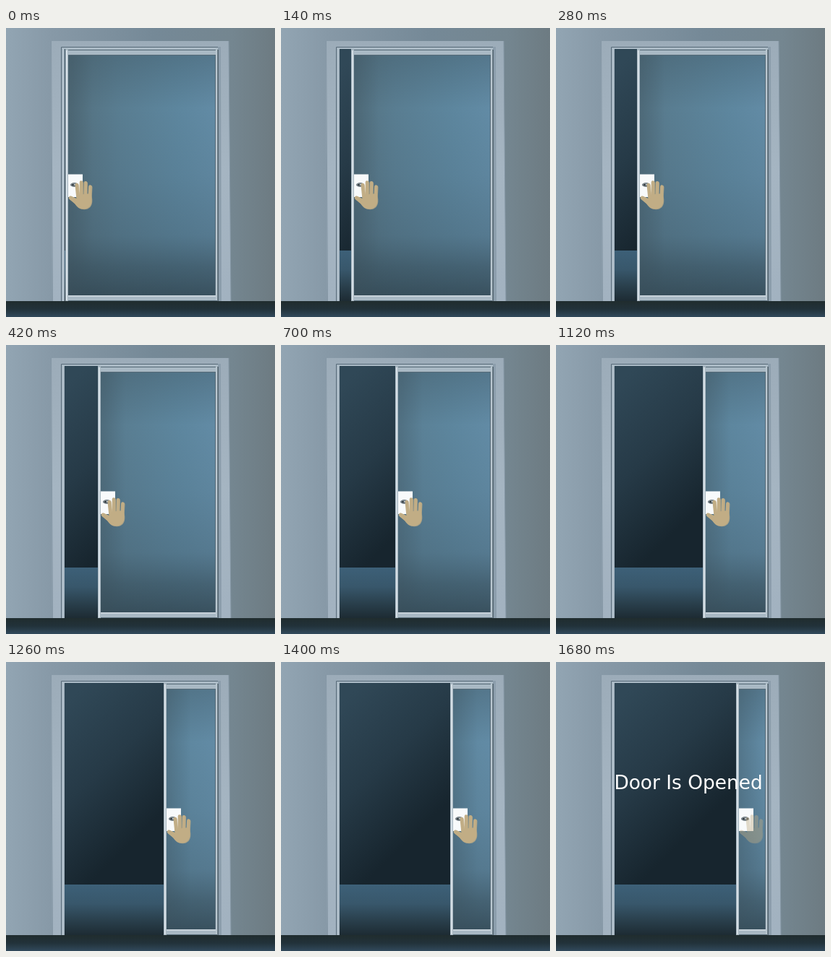
Recreate the animation shown at these times as an HTML page. Size 372 by 400 pixels, loop 8000 ms.

```html
<!DOCTYPE html>
<html lang="en">
<head>
<meta charset="utf-8">
<title>Sliding door</title>
<style>
  html, body { margin: 0; width: 100%; height: 100%; overflow: hidden; background: #71838f; }
  svg { display: block; width: 372px; height: 400px; }
  text { font: 26.4px "DejaVu Sans", sans-serif; fill: #fff; }
</style>
</head>
<body>
<svg viewBox="0 0 372 400">
  <defs>
    <linearGradient id="wall">
      <stop offset="0" stop-color="#92a5b3"/>
      <stop offset=".17" stop-color="#8799a7"/>
      <stop offset=".55" stop-color="#758997"/>
      <stop offset=".84" stop-color="#748690"/>
      <stop offset="1" stop-color="#6d7b82"/>
    </linearGradient>
    <linearGradient id="floor" x2="0" y2="1">
      <stop offset="0" stop-color="#202c2e"/>
      <stop offset=".5" stop-color="#22323a"/>
      <stop offset="1" stop-color="#31495b"/>
    </linearGradient>
    <linearGradient id="jamb" x2="0" y2="1">
      <stop offset="0" stop-color="#9cacb9"/>
      <stop offset=".5" stop-color="#a5b5c2"/>
      <stop offset="1" stop-color="#a2b2c0"/>
    </linearGradient>
    <linearGradient id="glass">
      <stop offset="0" stop-color="#536f7d"/>
      <stop offset=".35" stop-color="#597d91"/>
      <stop offset=".75" stop-color="#5d869e"/>
      <stop offset="1" stop-color="#628ba5"/>
    </linearGradient>
    <linearGradient id="glassShade" x2="0" y2="1">
      <stop offset="0" stop-color="#3f5764" stop-opacity=".38"/>
      <stop offset=".22" stop-color="#3f5764" stop-opacity="0"/>
      <stop offset=".5" stop-color="#3a5261" stop-opacity=".1"/>
      <stop offset=".75" stop-color="#3a5260" stop-opacity=".3"/>
      <stop offset=".88" stop-color="#344a56" stop-opacity=".62"/>
      <stop offset="1" stop-color="#30444f" stop-opacity=".82"/>
    </linearGradient>
    <linearGradient id="edgeShade">
      <stop offset="0" stop-color="#3b505c" stop-opacity=".32"/>
      <stop offset="1" stop-color="#3b505c" stop-opacity="0"/>
    </linearGradient>
    <linearGradient id="room" gradientUnits="userSpaceOnUse" x1="95" y1="45" x2="235" y2="190">
      <stop offset="0" stop-color="#304857"/>
      <stop offset=".5" stop-color="#263a47"/>
      <stop offset="1" stop-color="#17252e"/>
    </linearGradient>
    <linearGradient id="roomFloor" x2="0" y2="1">
      <stop offset="0" stop-color="#3d6078"/>
      <stop offset=".38" stop-color="#38576b"/>
      <stop offset=".7" stop-color="#2a404d"/>
      <stop offset="1" stop-color="#1d2b33"/>
    </linearGradient>
    <clipPath id="gap"><rect id="gapRect" x="81" y="28" width="1" height="350"/></clipPath>
    <clipPath id="slot"><rect x="81" y="28" width="208" height="350"/></clipPath>
  </defs>

  <rect width="372" height="378" fill="url(#wall)"/>
  <rect y="378" width="372" height="22" fill="url(#floor)"/>

  <!-- casing -->
  <path d="M62 18H308L311 378H294V30H81V378H64Z" fill="url(#jamb)"/>
  <path d="M62.500 18L64.500 378M308 18L311 378" stroke="#8597a5"/>
  <path d="M76.500 378V26.500H293" fill="none" stroke="#596c7a"/>
  <path d="M79 378V28.500H293" fill="none" stroke="#b0bfca" stroke-width="2"/>
  <path d="M81.500 378V30" stroke="#6d808d"/>
  <path d="M293 26H297L298 378H293Z" fill="#8c9eac"/>

  <!-- closed panel -->
  <rect x="82" y="30" width="210" height="348" fill="#a9b9c4"/>
  <rect x="86" y="38" width="204" height="332" fill="url(#glass)"/>
  <rect x="86" y="38" width="204" height="332" fill="url(#glassShade)"/>
  <path d="M82 30.500H292M84 37.500H290M82 377.500H292M289.500 38V370" stroke="#566a77"/>
  <path d="M84 371H290" stroke="#c6d1d9" stroke-width="2"/>
  <path d="M291 30V377" stroke="#bac7d0" stroke-width="2"/>
  <path d="M293.500 30V378" stroke="#53636f"/>

  <g clip-path="url(#gap)">
    <rect x="81" y="29" width="180" height="279" fill="url(#room)"/>
    <rect x="81" y="308" width="180" height="70" fill="url(#roomFloor)"/>
  </g>

  <g clip-path="url(#slot)">
    <g id="edge">
      <rect x="86" y="38" width="34" height="332" fill="url(#edgeShade)"/>
      <rect x="82" y="30" width="4" height="348" fill="#a9b8c2"/>
      <path d="M84 31V377" stroke="#d3dde4" stroke-width="2"/>
      <rect x="86" y="202.500" width="20" height="31.500" fill="#f8fafb"/>
      <ellipse cx="94.500" cy="217" rx="5.500" ry="3" fill="#707b82"/>
      <path d="M91 216.500H98" stroke="#c5ccd0" stroke-width="1.500"/>
      <circle cx="92.500" cy="217" r="1.300" fill="#252d32"/>
      <circle cx="97.500" cy="217" r="1" fill="#252d32"/>
      <g id="hand">
        <use href="#palm" x=".8" y=".8" color="#3d4748" opacity=".75"/>
        <g id="palm" color="#c1ad85">
          <path d="M97.800 217L99.500 234M104 213.500V234M110 214.300L109.500 234M116.400 219.500L115.500 237"
                fill="none" stroke="currentColor" stroke-width="4.600" stroke-linecap="round"/>
          <path d="M97.300 231L117.700 229L118.500 237C119 246 114 250.500 107.500 250.500C101 250.500 98 247.500 95 243L87.200 236.500C85.800 233.500 88.500 231.500 91 233L97.500 236Z" fill="currentColor"/>
        </g>
      </g>
    </g>
  </g>

  <text id="label" x="80.400" y="176">Door Is Opened</text>
</svg>
<script>
  const LOOP = 8000, STEP = 140, LAST = 11, STRIDE = 15.2, DONE = 1680;
  const [gapRect, edge, hand, label] =
    ["gapRect", "edge", "hand", "label"].map(id => document.getElementById(id));
  const start = performance.now();

  function draw(now) {
    const t = Math.max(0, now - start) % LOOP;
    const shift = Math.floor(Math.min(LAST, Math.floor(t / STEP)) * STRIDE);
    const opened = t >= DONE;
    gapRect.setAttribute("width", shift + 1);
    edge.setAttribute("transform", `translate(${shift} 0)`);
    hand.setAttribute("opacity", opened ? 0.42 : 1);
    label.setAttribute("visibility", opened ? "visible" : "hidden");
    requestAnimationFrame(draw);
  }
  draw(start);
</script>
</body>
</html>
```
